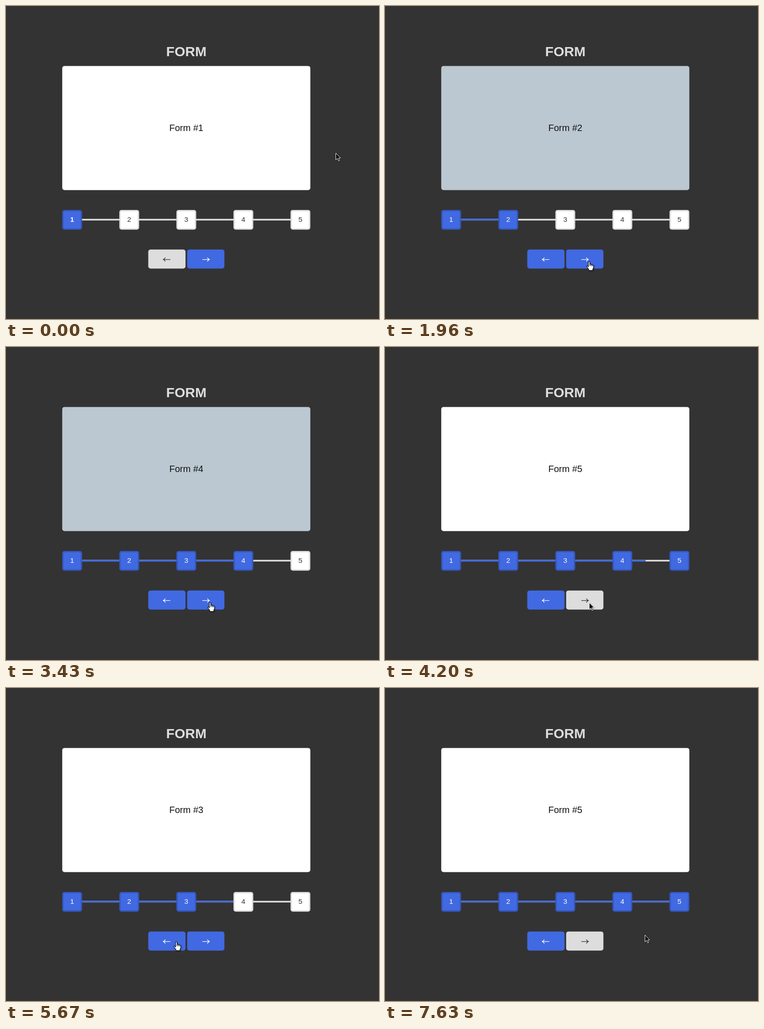
An HTML page that plays this animation: 817x686 px, repeating every 8.05 s.

```html
<!DOCTYPE html>
<html lang="en">
<head>
<meta charset="utf-8">
<title>Form steps</title>
<style>
  html, body { margin: 0; width: 100%; height: 100%; overflow: hidden; background: #333; }
  svg { display: block; width: 817px; height: 686px; }
  text { font-family: "Liberation Sans", Arial, sans-serif; text-anchor: middle; }
  .title { font-size: 30px; font-weight: bold; fill: #ddd; }
  .label { font-size: 20px; fill: #111; }
  .box rect { fill: #fff; stroke: #ddd; stroke-width: 3; }
  .box text { font-size: 15.5px; fill: #333; }
  .box.on rect { fill: #4169e1; stroke: #3558c0; }
  .box.on text { fill: #fff; }
  .button rect { fill: #4169e1; }
  .button path { fill: none; stroke: #fff; stroke-width: 1.4; }
  .button.off rect { fill: #ddd; }
  .button.off path { stroke: #333; }
  #cursor { filter: drop-shadow(1px 1px 1px rgba(0, 0, 0, .4)); }
</style>
</head>
<body>
<svg viewBox="0 0 817 686">
  <text class="title" x="395" y="110">FORM</text>
  <rect id="panel" x="123.2" y="131.4" width="543.4" height="272" rx="5"/>
  <text id="label" class="label" x="395" y="274"></text>
  <rect x="145" y="466.5" width="500" height="3.6" fill="#ddd"/>
  <rect id="bar" x="123.2" y="466.5" height="3.6" fill="#4169e1"/>
  <g id="boxes"></g>
  <g id="back" class="button">
    <rect x="311.6" y="533.8" width="81.6" height="41.6" rx="5"/>
    <path d="M360 555.6H345M349 551.2Q347.6 554.2 344.6 555.6Q347.6 557 349 560"/>
  </g>
  <g id="next" class="button">
    <rect x="396.8" y="533.8" width="81.6" height="41.6" rx="5"/>
    <path d="M430 555.6H445M441 551.2Q442.4 554.2 445.4 555.6Q442.4 557 441 560"/>
  </g>
  <circle id="press" r="11" fill="rgba(255,255,0,.47)"/>
  <g id="cursor">
    <path id="arrow" fill="#000" stroke="#fff" stroke-width="1"
      d="M.5.5V15.2L4 12L6.5 17.6L8.8 16.6L6.4 11.2H10.8Z"/>
    <path id="hand" fill="#fff" stroke="#000" stroke-width="1.1" stroke-linejoin="round"
      d="M-1.5 12V1.5Q-1.5 0 0 0T1.5 1.5V6.2Q3.8 5 4.4 7Q6.6 5.9 7.2 8Q9.8 7.2 9.8 9.8V13.5L8 17V19.5H-.5V17.5L-5 11.5Q-5.4 9.2-3.2 9.6ZM1.5 6.2V10M4.4 7V10.3M7.2 8V10.6"/>
  </g>
</svg>
<script>
const LOOP = 8050, TICK = 70, SLIDE = 300;
const $ = id => document.getElementById(id);

// time, step, how far the slide has run when it first shows
const steps = [
  [0, 1, SLIDE], [1750, 2, 30], [2590, 3, 12], [3290, 4, 30], [4200, 5, 60],
  [4970, 4, 30], [5670, 3, 12], [6440, 4, 0], [7140, 5, 60]
];
// start, end, from, to
const moves = [
  [280, 1120, [722, 322], [478, 560]],
  [1120, 1330, [478, 560], [447, 560]],
  [4270, 4690, [447, 560], [373, 556]],
  [5950, 6230, [373, 556], [436, 553]],
  [7280, 7630, [435, 554], [569, 541]]
];
const presses = [[1610, 1750], [6370, 6440]];

const boxes = [1, 2, 3, 4, 5].map(n => {
  const x = 123.2 + 125 * (n - 1);
  $('boxes').insertAdjacentHTML('beforeend',
    `<g class="box"><rect x="${x + 1.5}" y="448.4" width="40.4" height="40.4" rx="3.5"/>
     <text x="${x + 21.7}" y="473.3">${n}</text></g>`);
  return $('boxes').lastElementChild;
});

const clamp = v => Math.min(1, Math.max(0, v));
const mix = (a, b, k) => a + (b - a) * k;

// cubic-bezier(.25, .1, .25, 1)
function ease(x) {
  if (x >= 1) return 1;
  const curve = (a, b, u) => 3 * a * u * (1 - u) ** 2 + 3 * b * u * u * (1 - u) + u ** 3;
  let lo = 0, hi = 1;
  for (let i = 0; i < 24; i++) {
    const mid = (lo + hi) / 2;
    if (curve(.25, .25, mid) < x) lo = mid; else hi = mid;
  }
  return curve(.1, 1, lo);
}

function cursorAt(t) {
  const [start, end, from, to] = moves.filter(m => t >= m[0]).pop() || moves[0];
  const p = clamp((t - start) / (end - start));
  const k = mix(p, (1 - Math.cos(Math.PI * p)) / 2, .6);
  return [0, 1].map(i => Math.round(mix(from[i], to[i], k)));
}

function draw(t) {
  const index = steps.findLastIndex(s => t >= s[0]);
  const [since, step, lead] = steps[index];
  const previous = index ? steps[index - 1][1] : step;
  const level = mix(previous, step, ease(clamp((t - since + lead) / SLIDE)));

  $('panel').setAttribute('fill', step % 2 ? '#fff' : '#bbc8d1');
  $('label').textContent = 'Form #' + step;
  $('bar').setAttribute('width', 543.4 * (level - 1) / 4);
  boxes.forEach((box, i) => box.classList.toggle('on', i < step));
  boxes[0].style.fontWeight = index ? 'normal' : 'bold';
  $('back').classList.toggle('off', step === 1);
  $('next').classList.toggle('off', step === 5);

  const [x, y] = cursorAt(t);
  const inside = (left, right) => x > left && x < right && y > 534 && y < 575;
  const pointing = inside(312, 393) && step > 1 || inside(397, 478) && step < 5;
  $('cursor').setAttribute('transform', `translate(${x} ${y})`);
  $('hand').style.display = pointing ? '' : 'none';
  $('arrow').style.display = pointing ? 'none' : '';
  $('press').setAttribute('cx', x);
  $('press').setAttribute('cy', y);
  $('press').style.display = presses.some(([a, b]) => t >= a && t < b) ? '' : 'none';
}

const origin = performance.now();
function frame() {
  const t = (performance.now() - origin) % LOOP;
  draw(Math.floor(t / TICK) * TICK);
  requestAnimationFrame(frame);
}
frame();
</script>
</body>
</html>
```
